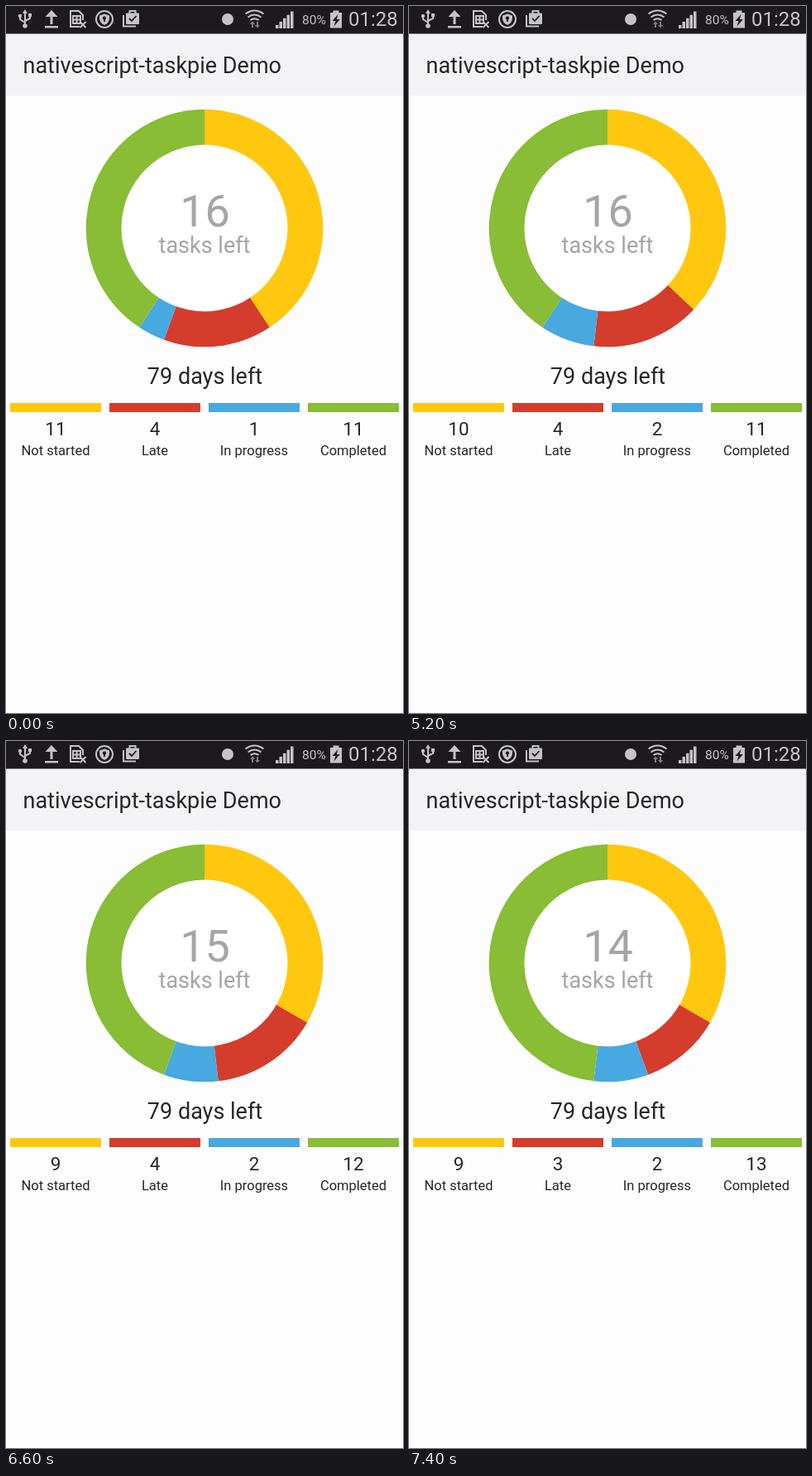
Write an HTML page that moves like this. It is 480x853 px and loops after 8 s.

```html
<!DOCTYPE html>
<html lang="en">
<head>
<meta charset="utf-8">
<title>Task pie demo</title>
<style>
  html, body { margin: 0; width: 100%; height: 100%; overflow: hidden; background: #fefdfe; }
  svg { display: block; width: 100%; height: 100%; }
  text { font-family: Roboto, "Open Sans", sans-serif; fill: #262528; }
  .mid { text-anchor: middle; }
  .big { font-size: 27px; }
  .pale { fill: #a5a4a6; }
  .count { font-size: 22.5px; }
  .label { font-size: 16.5px; }
  .status text { fill: #c4c3c5; }
  .line { fill: none; stroke: #c4c3c5; stroke-width: 2; }
  .fill { fill: #c4c3c5; }
  .dark { fill: #1c1a1d; }
  .cut { fill: none; stroke: #1c1a1d; stroke-width: 1.8; }
</style>
</head>
<body>
<svg viewBox="0 0 480 853">
  <rect width="480" height="853" fill="#fefdfe"/>
  <rect y="33" width="480" height="75" fill="#f3f2f4"/>
  <rect width="480" height="33.5" class="dark"/>

  <g class="status">
    <!-- usb -->
    <path class="line" stroke-width="1.6" d="M23 8V23M17 12V16L23 20M29 12V15L23 18"/>
    <path class="fill" d="M20 9L23 4L26 9ZM27 9H31V13H27Z"/>
    <circle class="fill" cx="17" cy="12" r="2.2"/>
    <circle class="fill" cx="23" cy="24" r="2.8"/>
    <!-- upload -->
    <path class="fill" d="M47.500 13L55 5L62.500 13H56.500V22H53.500V13ZM47 24H63V26.500H47Z"/>
    <!-- card with cross -->
    <path class="line" d="M89 25H78V6H88L93 11V17"/>
    <path class="line" stroke-width="1.500" d="M81 12H90V21H81ZM81 16.500H90M85.500 12V21"/>
    <path class="line" d="M89.500 19L96.500 26M96.500 19L89.500 26"/>
    <!-- shield -->
    <circle class="line" stroke-width="1.600" cx="119" cy="16" r="10"/>
    <path class="fill" d="M119 9.500L125 11.500V15Q125 20 119 23Q113 20 113 15V11.500Z"/>
    <path class="dark" d="M119 12.500A2 2 0 0 1 120 16.300V19H118V16.300A2 2 0 0 1 119 12.500Z"/>
    <!-- case with check -->
    <path class="line" d="M142 11V24.500H157"/>
    <path class="line" d="M149.500 9V6H156.500V9"/>
    <rect class="fill" x="145" y="8.500" width="16" height="13.500" rx="1"/>
    <path class="cut" d="M149 15L152 18L157.500 12"/>
    <!-- plain dot -->
    <circle class="fill" cx="268" cy="16" r="7"/>
    <!-- wireless fan -->
    <path class="line" stroke-width="2.600" d="M289.500 9.500Q300.500 1.500 311.500 9.500M292.500 13.500Q300.500 7.500 308.500 13.500M295.500 17Q300.500 13.500 305.500 17"/>
    <path class="fill" opacity=".6" d="M295 22L298 18.500L301 22H299V26H297V22ZM301 23H303V19H305V23H307L304 26.500Z"/>
    <g id="signal" class="fill"></g>
    <text x="358" y="22" font-size="15.500">80%</text>
    <!-- battery -->
    <path class="fill" d="M392 8H395.500V5.500H402.500V8H406V26.500H392Z"/>
    <path class="dark" d="M401.500 10L394.500 18H398.500L396.500 24.500L403.800 16H399.800Z"/>
    <text x="414" y="24" font-size="24">01:28</text>
  </g>

  <text class="big" x="20.500" y="81">nativescript-taskpie Demo</text>
  <g id="ring"></g>
  <circle cx="240" cy="268" r="100.500" fill="#fff"/>
  <text id="left" class="mid pale" x="240.500" y="266" font-size="54"></text>
  <text class="mid big pale" x="240" y="297.500">tasks left</text>
  <text class="mid big" x="240.500" y="456">79 days left</text>
  <g id="legend"></g>
</svg>
<script>
const LOOP = 8000;
const groups = [
  ["Not started", "#ffc80e"],
  ["Late", "#d43d2c"],
  ["In progress", "#48a8e0"],
  ["Completed", "#88bd35"]
];
// start time, then one count per group
const steps = [
  [0, 11, 4, 1, 11],
  [5000, 10, 4, 2, 11],
  [5800, 10, 4, 1, 12],
  [6600, 9, 4, 2, 12],
  [7200, 9, 3, 2, 13]
];

const byId = id => document.getElementById(id);

function add(parent, tag, attrs, text = "") {
  const el = document.createElementNS("http://www.w3.org/2000/svg", tag);
  for (const key in attrs) el.setAttribute(key, attrs[key]);
  el.textContent = text;
  parent.appendChild(el);
  return el;
}

function sector(from, to) {
  const point = turn => {
    const a = turn * 2 * Math.PI;
    return `${240 + 143.3 * Math.sin(a)} ${268 - 143.3 * Math.cos(a)}`;
  };
  const large = to - from > 0.5 ? 1 : 0;
  return `M240 268L${point(from)}A143.3 143.3 0 ${large} 1 ${point(to)}Z`;
}

for (let i = 0; i < 5; i++) {
  const h = 4 + i * 4.1;
  add(byId("signal"), "rect", { x: 326 + i * 4.5, y: 27 - h, width: 3.5, height: h });
}

const parts = groups.map(([name, fill], i) => {
  const legend = byId("legend"), x = 60 + i * 120;
  add(legend, "rect", { x: x - 55, y: 479, width: 110, height: 11, fill });
  add(legend, "text", { class: "mid label", x, y: 541.5 }, name);
  return {
    slice: add(byId("ring"), "path", { fill }),
    count: add(legend, "text", { class: "mid count", x, y: 518 })
  };
});

function show(counts) {
  const total = counts.reduce((a, b) => a + b);
  let sum = 0;
  counts.forEach((n, i) => {
    parts[i].slice.setAttribute("d", sector(sum / total, (sum + n) / total));
    parts[i].count.textContent = n;
    sum += n;
  });
  byId("left").textContent = total - counts[3];
}

let current;
function draw() {
  const t = performance.now() % LOOP;
  const step = steps.filter(s => s[0] <= t).pop();
  if (step !== current) {
    current = step;
    show(step.slice(1));
  }
  requestAnimationFrame(draw);
}
draw();
</script>
</body>
</html>
```
